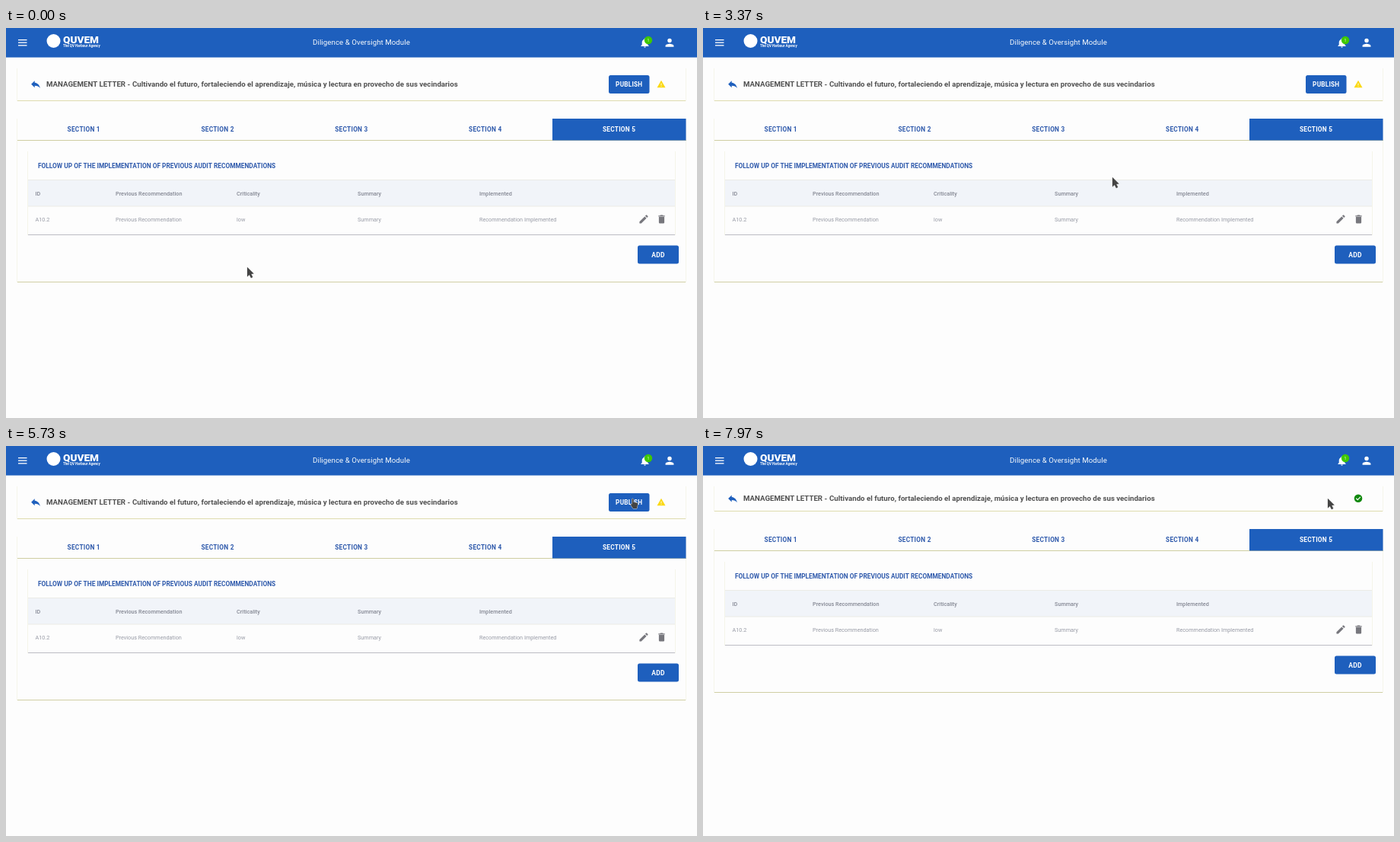
Animation, 908 px wide and 512 px high, one loop 8000 ms. Source, as an HTML page with a canvas:

```html
<!DOCTYPE html>
<html lang="en">
<head>
<meta charset="utf-8">
<title>Management letter</title>
<style>
html, body { margin: 0; width: 100%; height: 100%; overflow: hidden; background: #fdfdfd; }
canvas { display: block; width: 908px; height: 512px; }
</style>
</head>
<body>
<canvas id="stage" width="908" height="512"></canvas>
<script>
const ctx = document.getElementById('stage').getContext('2d');
const LOOP = 8000, PUBLISHED = 6600;
const BLUE = '#1e5fbd', LABEL = '#2f5aac', INK = '#505050';
const PAGE = '#fdfdfd', EDGE = '#f5f5ea';

const ICONS = {
  reply: 'M10 9V5L3 12l7 7v-4.1c5 0 8.5 1.6 11 5.1-1-5-4-10-11-11z',
  bell: 'M12 22a2 2 0 0 0 2-2h-4a2 2 0 0 0 2 2zM18 16v-5c0-3-1.6-5.6-4.5-6.3V4a1.5 1.5 0 0 0-3 0v.7C7.6 5.4 6 7.9 6 11v5l-2 2v1h16v-1z',
  person: 'M12 12a4 4 0 1 0 0-8 4 4 0 0 0 0 8zM12 14c-3 0-8 1.3-8 4v2h16v-2c0-2.7-5-4-8-4z',
  warning: 'M1 21h22L12 2zM13 18h-2v-2h2zM13 14h-2v-4h2z',
  pencil: 'M3 17.2V21h3.8L17.8 9.9l-3.7-3.7zM20.7 7a1 1 0 0 0 0-1.4l-2.3-2.3a1 1 0 0 0-1.4 0l-1.9 1.8 3.8 3.8z',
  trash: 'M6 19a2 2 0 0 0 2 2h8a2 2 0 0 0 2-2V7H6zM19 4h-3.5l-1-1h-5l-1 1H5v2h14z'
};
for (const name in ICONS) ICONS[name] = new Path2D(ICONS[name]);

const ARROW = new Path2D('M0 0V12.4L2.8 9.9 5 14.2 7.2 13 5.2 9 8.6 8.6z');
const HAND = new Path2D('M1.6 0.6Q2.8-.4 3.6 1V5L8 5.6Q9.3 6 9 8L8 13H3L0 8.6Q-.2 7 1.6 7.4z');

// Pointer path: time, x, y
const PATH = [
  [1670, 317, 314], [1700, 316, 311], [2520, 430, 240], [3370, 538, 196],
  [4170, 794, 113], [4470, 818, 105], [4900, 821, 69]
];

function rect(x, y, w, h, color) {
  ctx.fillStyle = color;
  ctx.fillRect(x, y, w, h);
}

function disc(x, y, r, color) {
  ctx.fillStyle = color;
  ctx.beginPath();
  ctx.arc(x, y, r, 0, Math.PI * 2);
  ctx.fill();
}

function text(str, x, y, size, weight, color, align = 'left', spacing = 0) {
  ctx.font = `${weight} ${size}px Roboto, sans-serif`;
  ctx.letterSpacing = spacing + 'px';
  ctx.textAlign = align;
  ctx.textBaseline = 'alphabetic';
  ctx.fillStyle = color;
  ctx.fillText(str, x, y + size * 0.356);
}

function icon(name, x, y, scale, color) {
  ctx.save();
  ctx.translate(x, y);
  ctx.scale(scale, scale);
  ctx.translate(-12, -12);
  ctx.fillStyle = color;
  ctx.fill(ICONS[name], 'evenodd');
  ctx.restore();
}

function card(x, y, w, h, bottom) {
  rect(x, y, 1, h, EDGE);
  rect(x + w - 1, y, 1, h, EDGE);
  rect(x + 1, y + h - 1, w - 2, 1, bottom);
}

function button(label, x, y, w, size) {
  ctx.fillStyle = BLUE;
  ctx.beginPath();
  ctx.roundRect(x, y, w, 24, 2.5);
  ctx.fill();
  text(label, x + w / 2, y + 12, size, 700, '#fff', 'center', 0.25);
}

function appBar() {
  rect(0, 0, 908, 38.6, BLUE);
  for (const y of [15, 18.6, 22.2]) rect(16, y, 11.5, 1.3, '#fff');
  disc(62.5, 17, 9, '#fff');
  text('QUVEM', 75, 15.6, 13.6, 900, '#fff');
  text('The QV Harbour Agency', 75, 23.2, 4.5, 700, '#fff');
  text('Diligence & Oversight Module', 467, 19, 9.7, 400, '#f4f8fb', 'center', 0.06);
  icon('bell', 839.5, 19.5, 0.63, '#fff');
  disc(844, 16, 5.2, '#3fc800');
  text('1', 844, 16, 5, 500, '#dff5d0', 'center');
  icon('person', 872, 19.3, 0.68, '#fff');
}

function titleCard(done) {
  const y = done ? 68.7 : 73.5;
  card(14, 53, 880, done ? 33 : 43, '#dedcae');
  icon('reply', 39, y + 0.3, 0.65, BLUE);
  text('MANAGEMENT LETTER -', 53, y, 9.7, 700, INK);
  text('Cultivando el futuro, fortaleciendo el aprendizaje, música y lectura en provecho de sus vecindarios',
    166, y, 9.7, 700, INK);
  if (done) {
    disc(861, y, 5.3, '#12890f');
    ctx.strokeStyle = '#fff';
    ctx.lineWidth = 1.2;
    ctx.beginPath();
    ctx.moveTo(858.2, y);
    ctx.lineTo(860.2, y + 2);
    ctx.lineTo(863.9, y - 1.8);
    ctx.stroke();
  } else {
    button('PUBLISH', 792, 62, 53.5, 8.2);
    icon('warning', 861, 73.8, 0.5, '#fbd915');
  }
}

function tabs() {
  rect(15, 147, 879, 1, '#cfcea2');
  rect(718, 119, 175.5, 28.5, BLUE);
  for (let i = 0; i < 5; i++) {
    text('SECTION ' + (i + 1), 102.2 + i * 175.85, 133.2, 8.3, 700,
      i === 4 ? '#fff' : LABEL, 'center', 0.25);
  }
}

function table(tint) {
  const columns = [38.5, 144, 303, 462, 622];
  const heads = ['ID', 'Previous Recommendation', 'Criticality', 'Summary', 'Implemented'];
  const cells = ['A10.2', 'Previous Recommendation', 'low', 'Summary', 'Recommendation Implemented'];
  card(28, 162, 852, 110, '#bcbcc4');
  rect(29, 199, 850, 35, '#f1f4f9');
  if (tint > 0) {
    ctx.globalAlpha = tint;
    rect(29, 199, 850, 71, '#e5e5ea');
    ctx.globalAlpha = 1;
  }
  rect(29, 199, 850, 1, '#ebebe6');
  rect(29, 233.5, 850, 1, tint > 0.5 ? '#d2d2d2' : '#ebebe6');
  columns.forEach((x, i) => {
    text(heads[i], x, 217, 7.26, 500, '#858894');
    text(cells[i], x, 251.7, 7.26, 400, '#989ba6');
  });
  icon('pencil', 838, 251, 0.62, '#77777d');
  icon('trash', 861.5, 251, 0.6, '#77777d');
}

function sections(tint) {
  card(14, 119, 880, 215, '#d0cfa4');
  tabs();
  text('FOLLOW UP OF THE IMPLEMENTATION OF PREVIOUS AUDIT RECOMMENDATIONS',
    42, 180.7, 8.36, 700, LABEL);
  table(tint);
  button('ADD', 830, 285.5, 54, 8.5);
}

function pointerAt(t) {
  if (t <= PATH[0][0]) return PATH[0].slice(1);
  for (let i = 1; i < PATH.length; i++) {
    const [t0, x0, y0] = PATH[i - 1], [t1, x1, y1] = PATH[i];
    if (t < t1) {
      const k = (t - t0) / (t1 - t0);
      return [x0 + (x1 - x0) * k, y0 + (y1 - y0) * k];
    }
  }
  return PATH[PATH.length - 1].slice(1);
}

function pointer(t, done) {
  const [x, y] = pointerAt(t).map(Math.round);
  const hand = !done && y < 86;
  ctx.save();
  ctx.translate(x, y);
  ctx.lineJoin = 'round';
  ctx.lineWidth = 1;
  ctx.strokeStyle = '#d6d6d6';
  ctx.fillStyle = '#444';
  const shape = hand ? HAND : ARROW;
  ctx.stroke(shape);
  ctx.fill(shape);
  ctx.restore();
}

function draw(t) {
  const done = t >= PUBLISHED;
  const tint = done ? 0 : Math.min(1, Math.max(0, (t - 5740) / 300));
  rect(0, 0, 908, 512, PAGE);
  appBar();
  titleCard(done);
  ctx.save();
  if (done) ctx.translate(0, -10);
  sections(tint);
  ctx.restore();
  pointer(t, done);
}

const start = performance.now();
function tick() {
  draw((performance.now() - start) % LOOP);
  requestAnimationFrame(tick);
}
tick();
</script>
</body>
</html>
```
